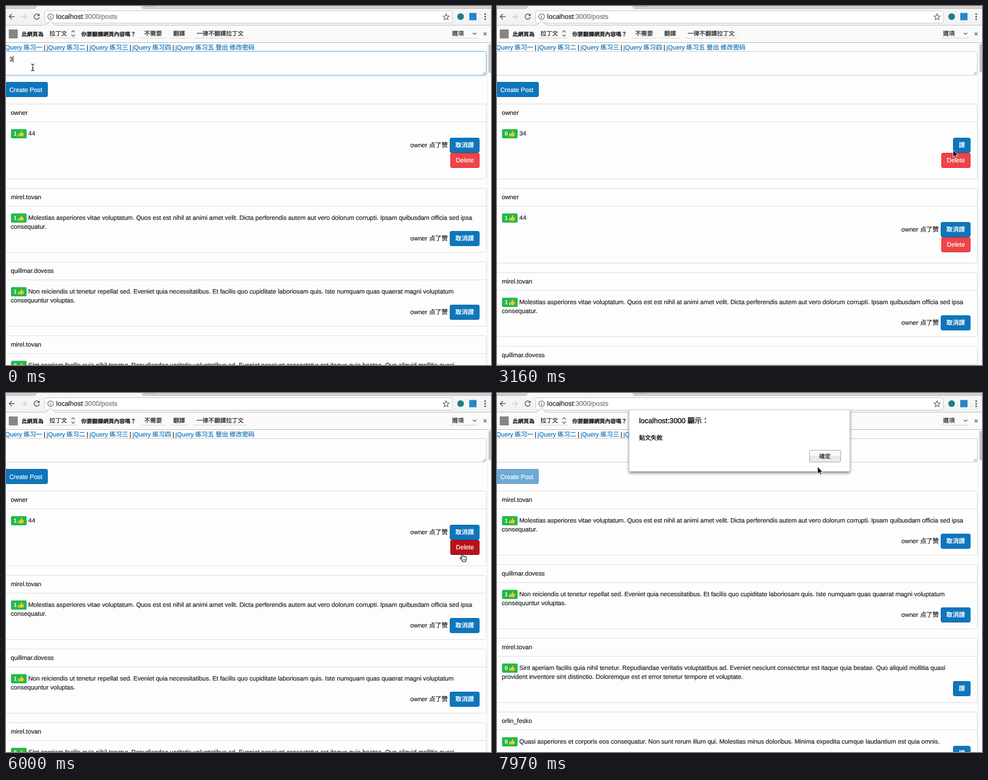
Animation of 870x643 px, one loop 8 s. Source, as an HTML page:

```html
<!DOCTYPE html>
<html lang="zh-TW">
<head>
<meta charset="utf-8">
<title>Posts</title>
<style>
  html, body { margin: 0; width: 100%; height: 100%; overflow: hidden; background: #fdfdfd; }
  svg { display: block; }
  text {
    font: 11.2px "Liberation Sans", "Noto Sans CJK TC", "Noto Sans CJK SC", "Noto Sans CJK", sans-serif;
    color: #222; fill: currentColor; stroke: currentColor; stroke-width: .22;
    text-rendering: geometricPrecision; white-space: pre;
  }
  .link text { color: #1276bd; }
  .light { color: #fff; }
  .bold { font-weight: 700; stroke-width: 0; }
  .strong { stroke-width: .4; color: #111; }
</style>
</head>
<body>
<svg width="870" height="643" viewBox="0 0 870 643">
  <defs>
    <filter id="glow" x="-5%" y="-30%" width="110%" height="160%"><feGaussianBlur stdDeviation="2"/></filter>
    <filter id="shadow" x="-10%" y="-20%" width="120%" height="150%">
      <feDropShadow dx="0" dy="2.5" stdDeviation="2.5" flood-opacity=".5"/>
    </filter>
    <linearGradient id="bar" x2="0" y2="1"><stop stop-color="#f8f7f8"/><stop offset="1" stop-color="#f2f1f2"/></linearGradient>
    <linearGradient id="key" x2="0" y2="1">
      <stop stop-color="#fff"/><stop offset=".5" stop-color="#f4f4f4"/>
      <stop offset=".52" stop-color="#e6e6e6"/><stop offset="1" stop-color="#f0f0f0"/>
    </linearGradient>
    <path id="thumb" d="M0 5h2.5v5H0zM3 5 5.2 2.4 5.5.4Q7.2-.4 7.3 1.7L6.9 4H9.400q1.200.5.600 1.600.5.800-.2 1.500.3.900-.5 1.400.1 1.200-1 1.500H5.500L3 9.200z" fill="#fdc52d"/>
    <path id="arrow" d="M0 0V13L3 10.2 5 14.6 7.1 13.7 5.2 9.3H9.4z" fill="#111" stroke="#fff" stroke-width=".9"/>
    <g id="hand">
      <path d="M-1.2 1Q-.2-.4.9.8L2.4 5Q3.5 4 4.3 5.2 5.3 4.4 6.1 5.7 7.4 5.2 7.8 6.6L8 10 6.8 12.5V14H.8L.4 12-3.4 8.1Q-3.8 6.6-2.2 6.8L-.1 8.2z" fill="#fff" stroke="#111" stroke-width="1.1" stroke-linejoin="round"/>
      <path d="M2 9.2v2.4M3.8 9.2v2.4M5.5 9.2v2.4" stroke="#333" stroke-width=".8"/>
    </g>
    <path id="ibeam" d="M-3-6Q0-6 0-4V4Q0 6-3 6M3-6Q0-6 0-4M0 4Q0 6 3 6M-1.5 1.5h3" fill="none" stroke="#222" stroke-width="1.1"/>
  </defs>

  <rect width="870" height="643" fill="#fdfdfd"/>
  <g id="page"></g>

  <!-- browser frame -->
  <rect width="870" height="35" fill="url(#bar)"/>
  <path d="M0 0H55L52 4.5H0zM243 0H870V4.5H246z" fill="#d9cfd0"/>
  <path d="M0 4.5H52L55 0M243 0l3 4.5H870" fill="none" stroke="#bdb3b4"/>
  <path d="M249 .5h19" stroke="#bd9b98"/>
  <rect y="35" width="870" height="30" fill="#fafafa"/>
  <path d="M0 65.5H870" stroke="#b9b9b9"/>
  <rect x="69.5" y="8.5" width="731" height="22" rx="3" fill="#fff" stroke="#c9c9c9"/>
  <path d="M0 34.5H72L80 26l8 8.5H870" fill="none" stroke="#c4c4c4"/>
  <path d="M73 35.5 80 27l7 8.5z" fill="#fafafa"/>
  <g fill="none" stroke="#5b5b5b" stroke-width="1.5">
    <path d="M15.500 19H6M10.500 14.300 5.800 19l4.700 4.700"/>
    <path d="M27 19h9.500M32 14.300l4.700 4.700-4.700 4.700" stroke="#cfcfcf"/>
    <path d="M58.600 15.800A4.700 4.700 0 1 0 59.700 20"/>
    <circle cx="80" cy="19" r="5" stroke-width="1.1"/>
    <path d="M80 18v4M80 15.500v1.300" stroke-width="1.2"/>
    <path d="m789.500 14 1.500 3.700 4 .3-3.100 2.600 1 3.900-3.400-2.100-3.400 2.100 1-3.900-3.100-2.600 4-.3z" stroke-width="1.1"/>
  </g>
  <path d="M60.300 13.500V18H55.800z" fill="#5b5b5b"/>
  <text x="90" y="23" style="font-size:12.05px">localhost<tspan color="#777" style="fill:#777;stroke:#777">:3000/posts</tspan></text>
  <circle cx="815.5" cy="19" r="6" fill="#1b7f85"/>
  <rect x="831" y="12.5" width="13" height="13" fill="#2586cc"/>
  <g fill="#555"><circle cx="859.5" cy="14.5" r="1.5"/><circle cx="859.5" cy="19" r="1.5"/><circle cx="859.5" cy="23.5" r="1.5"/></g>

  <rect x="5" y="42" width="16" height="16" fill="#858585"/>
  <g id="translate"></g>
  <path d="M74 57.500h52M242 57.500h44M294 57.500h33M337 57.500h95M796 57.500h50" stroke="#d4d4d4"/>
  <path d="m117.500 47 3-3 3 3M117.500 51.500l3 3 3-3M837.500 48l3 3 3-3M857 47.500l5 5M862 47.500l-5 5" fill="none" stroke="#555" stroke-width="1.2"/>

  <g id="dialog">
    <rect x="237" y="30" width="396" height="110.5" rx="2" fill="#fff" stroke="#aaa" stroke-width=".6" filter="url(#shadow)"/>
    <text class="strong" x="255" y="53.5" style="font-size:12.9px">localhost:3000 顯示：</text>
    <text class="strong" x="255" y="84" lang="zh-CN" style="font-size:10.5px">贴文失败</text>
    <rect x="560.5" y="102.5" width="56" height="21" rx="1.5" fill="url(#key)" stroke="#a5a5a5"/>
    <text x="578" y="117" style="font-size:10.2px">確定</text>
  </g>
  <use id="cursor"/>
</svg>

<script>
const LOOP = 8000, STEP = LOOP / 52;
const $ = id => document.getElementById(id);

// [fill, border]
const BLUE = ['#0e76bc', '#0c68a6'], DARK_BLUE = ['#0b5e95', '#094f7d'];
const RED = ['#ed4549', '#e8262b'], DARK_RED = ['#dc111d', '#c8101a'], PRESSED_RED = ['#b7121a', '#9a0f15'];

const OWNER = 'owner', MIREL = 'mirel.tovan', QUILL = 'quillmar.dovess', ORLIN = 'orlin_fesko';
const fresh = { name: OWNER, lines: ['34'], own: true };
const older = { name: OWNER, lines: ['44'], own: true, liked: true };
const rest = [
  { name: MIREL, liked: true, lines: [
    'Molestias asperiores vitae voluptatum. Quos est est nihil at animi amet velit. Dicta perferendis autem aut vero dolorum corrupti. Ipsam quibusdam officia sed ipsa',
    'consequatur.'] },
  { name: QUILL, liked: true, lines: [
    'Non reiciendis ut tenetur repellat sed. Eveniet quia necessitatibus. Et facilis quo cupiditate laboriosam quis. Iste numquam quas quaerat magni voluptatum',
    'consequuntur voluptas.'] },
  { name: MIREL, lines: [
    'Sint aperiam facilis quia nihil tenetur. Repudiandae veritatis voluptatibus ad. Eveniet nesciunt consectetur est itaque quia beatae. Quo aliquid mollitia quasi',
    'provident inventore sint distinctio. Doloremque est et error tenetur tempore et voluptate.'] },
  { name: ORLIN, lines: [
    'Quasi asperiores et corporis eos consequatur. Non sunt rerum illum qui. Molestias minus doloribus. Minima expedita cumque laudantium est quia omnis.'] },
];

// time, x, y of the pointer's hot spot
const path = [
  [0, 48, 110], [310, 48, 110], [600, 52, 146], [800, 52, 146], [1090, 484, 312],
  [1390, 592, 313], [1680, 600, 310], [2680, 795, 282], [2770, 796, 262],
  [2920, 812, 258], [3077, 818, 258], [3310, 830, 247], [3760, 832, 246],
  [4300, 822, 266], [4465, 821, 266], [4640, 826, 275], [4790, 829, 280],
  [5840, 828, 281], [5990, 818, 288], [6150, 817, 287], [6600, 56, 145],
  [6760, 50, 139], [7080, 50, 139], [7230, 60, 142], [7690, 500, 135], [7840, 575, 132],
];

function pointerAt(time) {
  const t = Math.max(0, Math.floor((time + 5) / STEP) * STEP);
  const next = path.findIndex(key => key[0] > t);
  if (next < 0) return path[path.length - 1].slice(1);
  const [t0, x0, y0] = path[next - 1], [t1, x1, y1] = path[next];
  const k = (t - t0) / (t1 - t0);
  return [x0 + (x1 - x0) * k, y0 + (y1 - y0) * k];
}

const text = (x, y, str, attrs = '') => `<text x="${x}" y="${y}" ${attrs}>${str}</text>`;

const button = (x, y, w, [fill, border], label, cls = '', opacity = 1) =>
  `<g opacity="${opacity}">
    <rect x="${x + .5}" y="${y + .5}" width="${w - 1}" height="26" rx="2.5" fill="${fill}" stroke="${border}"/>
    ${text(x + w / 2, y + 17.3, label, `class="light ${cls}" text-anchor="middle"`)}</g>`;

const likeLeft = post => post.liked ? 796 : 818;

function drawPost(post, top, likeColors, deleteColors) {
  const buttonTop = top + 44.5 + 16 * post.lines.length;
  const left = likeLeft(post);
  return `<rect x="-9.5" y="${top}" width="871" height="${post.own ? 134 : 115}" rx="3" fill="none" stroke="#dcdcdc"/>
    <path d="M0 ${top + 32}H861" stroke="#dcdcdc"/>
    ${text(8.5, top + 19.8, post.name)}
    <rect x="9" y="${top + 45}" width="28" height="16.5" rx="2" fill="#22b94c"/>
    ${text(13.8, top + 56.8, post.liked ? 1 : 0, 'class="light bold" style="font-size:10px"')}
    <use href="#thumb" x="21.8" y="${top + 48}"/>
    ${post.lines.map((line, i) => text(i ? 8.5 : 40, top + 56.5 + 16 * i, line)).join('')}
    ${post.liked ? text(792.5, buttonTop + 16.5, OWNER + ' 点了赞', 'text-anchor="end" lang="zh-CN"') : ''}
    ${button(left, buttonTop, 849.5 - left, likeColors, post.liked ? '取消讚' : '讚', 'bold')}
    ${post.own ? button(797, buttonTop + 27, 52.5, deleteColors, 'Delete') : ''}`;
}

function drawPage(s) {
  const links = [...'一二三四五'].map((n, i) =>
    text(77 * i - 4, 77.5, 'jQuery') + text(77 * i + 31.5, 77.5, '练习' + n)).join('');
  const bars = [1, 2, 3, 4].map(i => text(77 * i - 9.3, 77.5, '|')).join('');
  let top = 175.5;
  const posts = s.posts.map((post, i) => {
    const markup = drawPost(post, top, i ? BLUE : s.likeColors, i ? RED : s.deleteColors);
    top += post.own ? 151 : 132;
    return markup;
  }).join('');
  const box = '<rect x="-9.5" y="81.5" width="871" height="42.5" rx="3"';
  return `<g class="link" lang="zh-CN">${links}${text(376, 77.5, '登出')}${text(401, 77.5, '修改密码')}</g>${bars}
    ${s.typed ? box + ' fill="none" stroke="#66afe9" stroke-width="2" opacity=".4" filter="url(#glow)"/>' : ''}
    ${box} fill="#fdfdfd" stroke="${s.typed ? '#66afe9' : '#ccc'}"/>
    <path d="m855 122.5 5-5M858 122.5l2-2" stroke="#777"/>
    ${s.typed ? text(6, 99, s.typed) + `<path d="M${6.8 + 6.23 * s.typed.length} 89v12" stroke="#222"/>` : ''}
    ${button(-4, 136, 79, s.createColors, '', '', s.disabled ? .6 : 1)}
    ${text(6, 153.5, 'Create Post', 'class="light"')}
    ${posts}
    <path d="M863.5 66V643" stroke="#ececec"/>
    <rect x="865.5" y="68" width="8" height="${53 - s.posts.length + rest.length}" rx="3" fill="#c5c5c5"/>`;
}

function stateAt(t) {
  const posted = t >= 770, liked = t >= 3760, dialog = t >= 7230, disabled = t >= 7180;
  const posts = [...rest];
  if (t < 6150) posts.unshift(older);
  if (posted && t < 4790) posts.unshift({ ...fresh, liked });

  const first = posts[0];
  const likeTop = first.own ? 236 : 252;
  const inside = ([x, y], left, top, right, bottom) => x >= left && x <= right && y >= top && y <= bottom;
  const onCreate = p => inside(p, 0, 136, 75, 163);
  const onLike = p => inside(p, likeLeft(first), likeTop, 849, likeTop + 26.5);
  const onDelete = p => first.own && inside(p, 797, 263, 849, 290);

  // Hover colours follow one step behind the pointer.
  const pointer = pointerAt(t), before = pointerAt(Math.max(0, t - STEP));
  const pressed = (t >= 4640 && t < 4790) || (t >= 5990 && t < 6150);
  const kind = dialog ? 'arrow'
    : onCreate(pointer) || onLike(pointer) || onDelete(pointer) ? 'hand'
    : inside(pointer, 0, 82, 861, 124) ? 'ibeam' : 'arrow';
  return {
    posts, pointer, kind, dialog, disabled,
    typed: posted ? '' : t < 150 ? '3' : '34',
    createColors: !disabled && onCreate(before) ? DARK_BLUE : BLUE,
    likeColors: onLike(before) ? DARK_BLUE : BLUE,
    deleteColors: pressed ? PRESSED_RED : onDelete(before) ? DARK_RED : RED,
  };
}

$('translate').innerHTML = [
  [28, 54, 9.8, '此網頁為', 'strong'], [78, 53, 10.5, '拉丁文'], [135, 54, 9.8, '你要翻譯網頁內容嗎？', 'strong'],
  [248, 53, 10.6, '不需要'], [300, 53, 10.6, '翻譯'], [342, 53, 10.55, '一律不翻譯拉丁文'], [800, 53, 10.5, '選項'],
].map(([x, y, size, label, cls = '']) => text(x, y, label, `class="${cls}" style="font-size:${size}px"`)).join('');

const start = performance.now();
let shown = '';
function frame() {
  const s = stateAt((performance.now() - start) % LOOP);
  const markup = drawPage(s);
  if (markup !== shown) $('page').innerHTML = shown = markup;
  $('dialog').style.display = s.dialog ? '' : 'none';
  $('cursor').setAttribute('href', '#' + s.kind);
  $('cursor').setAttribute('transform', `translate(${s.pointer})`);
  requestAnimationFrame(frame);
}
frame();
</script>
</body>
</html>
```
